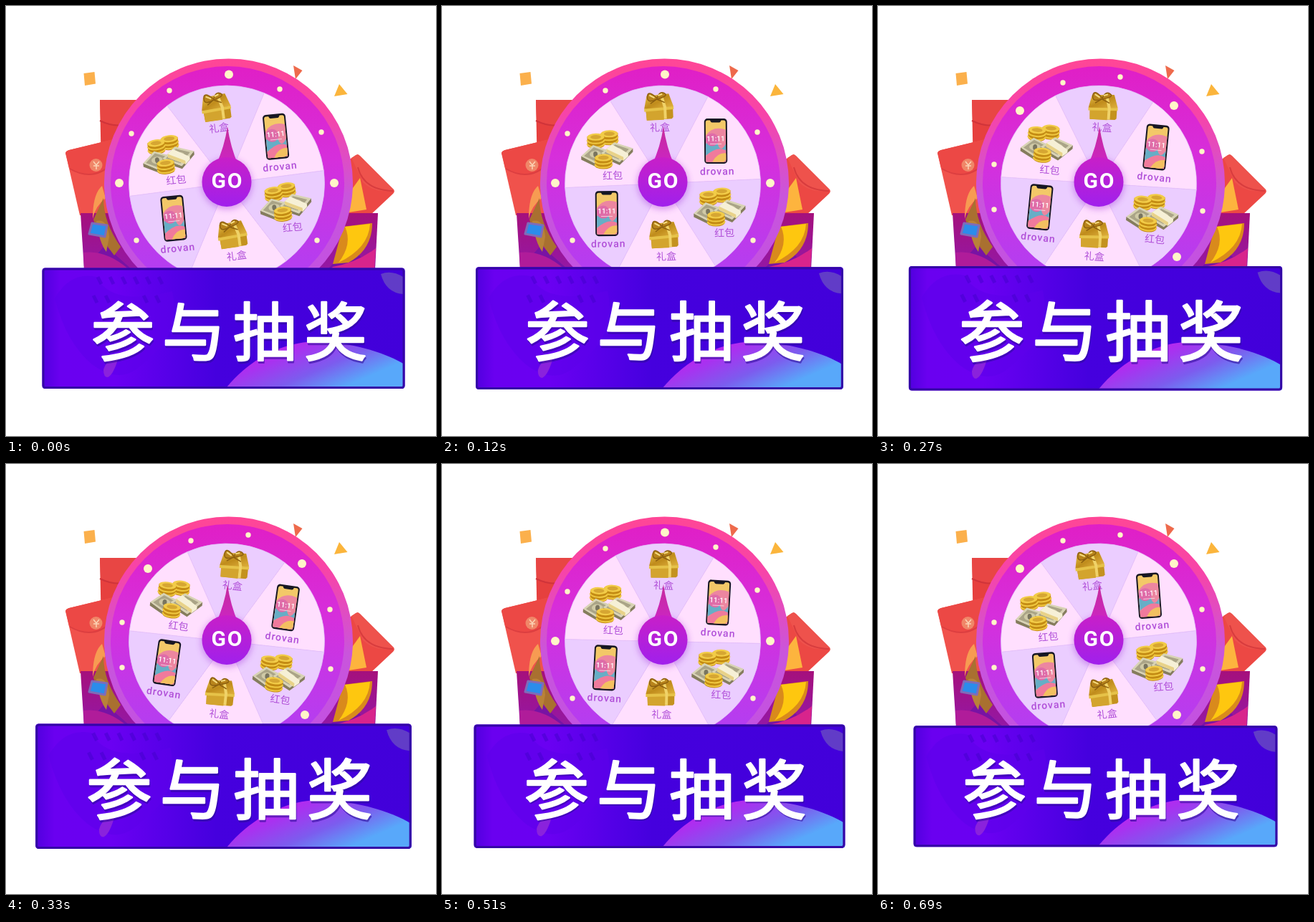
An HTML page for the animation above (720 ms loop, 600 by 600 pixels).

```html
<!DOCTYPE html>
<html lang="zh">
<head>
<meta charset="utf-8">
<title>参与抽奖</title>
<style>
  html, body { margin: 0; width: 100%; height: 100%; overflow: hidden; background: #fff; }
  svg { display: block; width: 100vw; height: 100vh; }
  text { text-anchor: middle; font-family: "Noto Sans CJK SC", sans-serif; }
  .label { font-size: 14px; fill: #b04fd8; }
  .brand { font: 500 14px Roboto, sans-serif; letter-spacing: 1px; }
  .latin { font-family: Roboto, sans-serif; fill: #fff; }
</style>
</head>
<body>
<svg viewBox="0 0 600 600">
  <defs>
    <linearGradient id="rim" x2="0" y2="1">
      <stop stop-color="#ff4696"/><stop offset=".22" stop-color="#f744a8"/>
      <stop offset=".55" stop-color="#c955dc"/><stop offset="1" stop-color="#c04fe4"/>
    </linearGradient>
    <linearGradient id="ring" x2="0" y2="1">
      <stop stop-color="#e01fc6"/><stop offset=".4" stop-color="#d62fdc"/>
      <stop offset=".85" stop-color="#b53df0"/>
    </linearGradient>
    <linearGradient id="hub" x2="0" y2="1">
      <stop stop-color="#c81fc8"/><stop offset="1" stop-color="#a020ec"/>
    </linearGradient>
    <linearGradient id="needle" x2="0" y2="1">
      <stop stop-color="#c62c9a"/><stop offset="1" stop-color="#cc25c6"/>
    </linearGradient>
    <linearGradient id="chest" x2="0" y2="1">
      <stop stop-color="#a5107c"/><stop offset="1" stop-color="#9418a6"/>
    </linearGradient>
    <linearGradient id="panel">
      <stop stop-color="#5000de"/><stop offset=".05" stop-color="#6a00f0"/><stop offset=".2" stop-color="#6a00f2"/>
      <stop offset=".35" stop-color="#5600e8"/><stop offset=".48" stop-color="#4500de"/>
      <stop offset="1" stop-color="#4200da"/>
    </linearGradient>
    <linearGradient id="dome" x2="1" y2=".6">
      <stop offset=".1" stop-color="#d611ee"/><stop offset=".38" stop-color="#a832f0"/>
      <stop offset=".65" stop-color="#7c5cee"/><stop offset=".92" stop-color="#58a8fa"/>
    </linearGradient>
    <linearGradient id="gold" x2="1" y2="1">
      <stop stop-color="#e8c24a"/><stop offset=".5" stop-color="#c08c1c"/><stop offset="1" stop-color="#e2b440"/>
    </linearGradient>
    <filter id="soft" x="-50%" y="-50%" width="200%" height="200%"><feGaussianBlur stdDeviation="4"/></filter>

    <g id="gift">
      <path d="M-18 2H20V17L18 19-17 20Z" fill="#c4921f"/>
      <path d="M-18 3H7V20H-17Z" fill="#d3a42e"/>
      <path d="M-16-14 15-16 21 2-20 4Z" fill="url(#gold)"/>
      <path d="M-20 4 21 2V6L-20 8Z" fill="#e6c248"/>
      <path d="M2-16H6L11 2V19H7V3Z" fill="#f0d268"/>
      <path d="M-2-11Q-14-23-15-13T-2-9Q2-21 9-17T-2-9L9-4M-2-9-11-3" fill="#b8841c" stroke="#8e6010" stroke-width="1.500"/>
      <path d="M-12-15-5-11M0-14 6-16" stroke="#f5dc80" stroke-width="2"/>
    </g>

    <g id="coins">
      <path d="M-12-6V6A12 5 0 0 0 12 6V-6Z" fill="#c48c14"/>
      <path d="M-12-1A12 5 0 0 0 12-1M-12 4A12 5 0 0 0 12 4" fill="none" stroke="#f0c840" stroke-width="2"/>
      <ellipse cy="-5" rx="12" ry="5" fill="#f2cc48"/>
      <ellipse cy="-5" rx="7.500" ry="2.800" fill="#d6a632"/>
    </g>

    <g id="bills">
      <path d="M-20 4 3 17V21L-20 9ZM3 17 20-2V3L3 21Z" fill="#857d5d"/>
      <path d="M-20 4-3-11 20-2 3 17Z" fill="#d8d3b4"/>
      <path d="M-16 4-2-8 15-1 2 13Z" fill="#aaa487"/>
      <ellipse cy="2" rx="8" ry="5" fill="#cfc9a6"/>
      <ellipse cy="2" rx="3" ry="4" fill="#79755f"/>
    </g>

    <g id="money">
      <use href="#coins" x="4" y="-17"/>
      <use href="#coins" x="-15" y="-13"/>
      <use href="#bills" x="-16" y="4"/>
      <g transform="translate(14 1) scale(1.120 1)">
        <use href="#bills"/>
        <path d="M-13-2-6-8 14 5V9L8 15-13 3Z" fill="#f6f0d6"/>
        <path d="M-13-2 8 10V15L-13 3Z" fill="#e8d288"/>
      </g>
      <use href="#coins" x="-5" y="16"/>
    </g>

    <g id="phone">
      <rect x="-16" y="-31.500" width="32" height="63" rx="4.500" fill="#171723"/>
      <rect x="-14" y="-29" width="28" height="58" rx="3" fill="#f3c868"/>
      <path d="M-14-8Q-4-22 14-16V29H-14Z" fill="#ec86a0"/>
      <path d="M-14 4Q-2-14 2 2T14 4V16Q0 8-14 20Z" fill="#66aec6"/>
      <circle cx="-5" cy="-2" r="9" fill="#df6ca8"/>
      <path d="M-14 22Q0 6 14 13V26L11 29H-11L-14 26Z" fill="#f07a9c"/>
      <path d="M-5 29Q2 16 14 17V26L11 29Z" fill="#f3c060"/>
      <path d="M-8-30H8Q7-26 5-26H-5Q-7-26-8-30Z" fill="#171723"/>
      <text class="latin" font-size="10" font-weight="500">11:11</text>
      <path d="M-8 4H8" stroke="#fff" opacity=".6"/>
    </g>
  </defs>

  <!-- confetti -->
  <path d="M108.500 94 123.500 92 125 108.500 110 111Z" fill="#fbb04c"/>
  <path d="M401 83 413.500 90 404 102Z" fill="#ee6a4c"/>
  <path d="M465 109 476.500 123 458 126Z" fill="#fbb53c"/>

  <!-- red envelopes -->
  <path d="M131 131H190V230H133Z" fill="#e6403e"/>
  <path d="M131 131H190L178 158Q160 172 132 160Z" fill="#e84644"/>
  <path d="M131 160Q160 174 180 158" fill="none" stroke="#d0343a" stroke-width="2"/>
  <path d="M83 205Q84 202 88 201L150 186V292H103Z" fill="#f0524c"/>
  <path d="M83 205Q84 202 88 201L150 186V220Q125 246 88 226Z" fill="#ec4845"/>
  <path d="M89 227Q122 246 148 220" fill="none" stroke="#dc3e40" stroke-width="2"/>
  <circle cx="125.500" cy="222" r="9" fill="#f08668"/>
  <path d="M122 217 126 222 130 217M126 222V228M122 223H130" fill="none" stroke="#fbd3b4" stroke-width="1.500"/>
  <path d="M478 215 488 208Q491 206 494 209L541 256Q543 259 540 262L508 292H462Z" fill="#ec4844"/>
  <path d="M482 212 491 207 541 257Q515 262 498 246Z" fill="#ee524c"/>
  <path d="M491 225Q499 257 540 258" fill="none" stroke="#d83c3e" stroke-width="2"/>

  <!-- chest and ribbons -->
  <path d="M104 289H519L515 368H109Z" fill="url(#chest)"/>
  <path d="M108 368 138 334 176 368ZM514 368 480 336 448 368Z" fill="#7813a4"/>
  <path d="M108 344Q140 340 172 368H109Z" fill="#b01c9a"/>
  <path d="M121 297Q121 262 134 251L139 268Q124 280 121 297Z" fill="#f79b52"/>
  <path d="M136 268Q136 302 160 336L151 348Q128 318 122 298Z" fill="#a97030"/>
  <path d="M126 300Q142 296 144 322L140 343Q130 330 126 300Z" fill="#b98238"/>
  <path d="M120 303 141 306 138 322 116 318Z" fill="#2b8ceb" stroke="#7f6cb8" stroke-width="3" stroke-linejoin="round"/>
  <path d="M481 258 494 240 503 284 478 288Z" fill="#fdb43e"/>
  <path d="M470 308 511 303Q511 340 478 358L456 360Z" fill="#d98a1c"/>
  <path d="M473 308 508 304Q506 338 464 358Q484 332 473 308Z" fill="#fec70f"/>
  <path d="M456 364Q490 358 516 338L514 368H452Z" fill="#d8248c"/>

  <!-- wheel -->
  <circle cx="310.500" cy="247" r="173.500" fill="url(#rim)"/>
  <circle cx="309" cy="247" r="163" fill="url(#ring)"/>
  <g id="bulbs" fill="#fff6c8"></g>
  <g id="wheel"></g>
  <circle cx="308" cy="248" r="36" fill="#a030d8" opacity=".4" filter="url(#soft)"/>
  <path d="M309 168Q313 196 324 222H293Q305 196 309 168Z" fill="url(#needle)"/>
  <circle cx="308" cy="245.500" r="34.500" fill="url(#hub)"/>
  <text class="latin" x="309" y="254" font-size="30" font-weight="700" letter-spacing="2">GO</text>

  <!-- banner -->
  <g id="banner">
    <rect x="50.500" y="365.500" width="506" height="168.500" rx="4" fill="url(#panel)"/>
    <path d="M68 408Q90 370 126 378 148 420 232 398 246 460 190 500 160 530 120 500 84 470 68 408Z" fill="#5e00ec" opacity=".6"/>
    <path d="M128 378l5 10m12-10 5 10m12-10 5 10m12-10 5 10m12-10 5 10m12-10 5 10M122 404l5 10m12-10 5 10m48-10 5 10m12-10 5 10" stroke="#4300cc" stroke-width="5" opacity=".5"/>
    <path d="M136 508Q139 494 158 486 151 514 142 518 136 518 136 508Z" fill="#8a22dc"/>
    <path d="M307 533C342 490 390 468 435 468 485 470 530 484 556 500V533Z" fill="url(#dome)"/>
    <path d="M523 374Q538 368 554 378V402Q530 400 523 374Z" fill="#6a4cc4" opacity=".8"/>
    <rect x="52" y="367" width="503" height="165.500" rx="3" fill="none" stroke="#3406a6" stroke-width="3"/>
    <g font-size="88" letter-spacing="11" stroke-width="2.600" stroke-linejoin="round">
      <text x="318" y="489.500" fill="#2c0a98" stroke="#2c0a98" opacity=".55">参与抽奖</text>
      <text x="317" y="487" fill="#fff" stroke="#fff">参与抽奖</text>
    </g>
  </g>
</svg>
<script>
const $ = id => document.getElementById(id);
const PERIOD = 720, STEP = 30, BLINK = 180;

// Bulbs: two alternating sets of [x, y], the first three of each are large.
const bulbSets = [
  [[311, 95.5], [158, 247], [458, 247], [228, 118], [382, 116], [175, 178], [440, 176], [182, 327], [434, 327]],
  [[198, 146], [413, 139], [417, 350], [258, 107], [338, 99], [162, 221], [452, 203], [162, 284], [453, 286]]
];
$('bulbs').innerHTML = bulbSets.map(set => '<g>' + set.map(([x, y], i) =>
  `<circle cx="${x}" cy="${y}" r="${i < 3 ? 6 : 3.7}"/>`).join('') + '</g>').join('');

// Wheel content, centred on its axle.
const R = 136.5;
const rim = deg => {
  const a = deg * Math.PI / 180;
  return `${R * Math.sin(a)} ${-R * Math.cos(a)}`;
};
const sector = i => `<path d="M0 0L${rim(60 * i - 30)}A${R} ${R} 0 0 1 ${rim(60 * i + 30)}Z"
  fill="${i % 2 ? '#ffdffe' : '#ebcdff'}" stroke="#e3c3fa" stroke-width=".7"/>`;
const prize = (art, x, y, name, nx, ny, tilt = 0) =>
  `<use href="#${art}" transform="translate(${x} ${y}) rotate(${tilt})"/>
   <text class="label ${art === 'phone' ? 'brand' : ''}" transform="translate(${nx} ${ny + 5}) rotate(${tilt})">${name}</text>`;

$('wheel').innerHTML = [0, 1, 2, 3, 4, 5].map(sector).join('') +
  prize('gift', -1.3, -108.7, '礼盒', -0.6, -78.1) +
  prize('phone', 76.5, -55.7, 'drovan', 76.7, -13.7, 2) +
  prize('money', 77.5, 36.4, '红包', 82.9, 72.7, 1) +
  prize('gift', -2, 70, '礼盒', 0.5, 102.1) +
  prize('phone', -79.8, 38.6, 'drovan', -79.6, 80.6, 2) +
  prize('money', -75.9, -50.4, '红包', -69.5, -14, 1);

function draw(now) {
  const t = Math.floor(now % PERIOD / STEP) * STEP;
  const swing = 1 - Math.abs(2 * t / PERIOD - 1);
  $('wheel').setAttribute('transform', `translate(308 247.5) rotate(${15 * swing - 7.5})`);
  $('banner').setAttribute('transform',
    `translate(303.5 450) scale(${1 + 0.04 * swing}) translate(-303.5 -450)`);
  const lit = Math.floor(t / BLINK) % 2;
  [...$('bulbs').children].forEach((set, i) => set.setAttribute('visibility', i === lit ? 'visible' : 'hidden'));
}

const start = performance.now();
(function loop() {
  draw(performance.now() - start);
  requestAnimationFrame(loop);
})();
</script>
</body>
</html>
```
